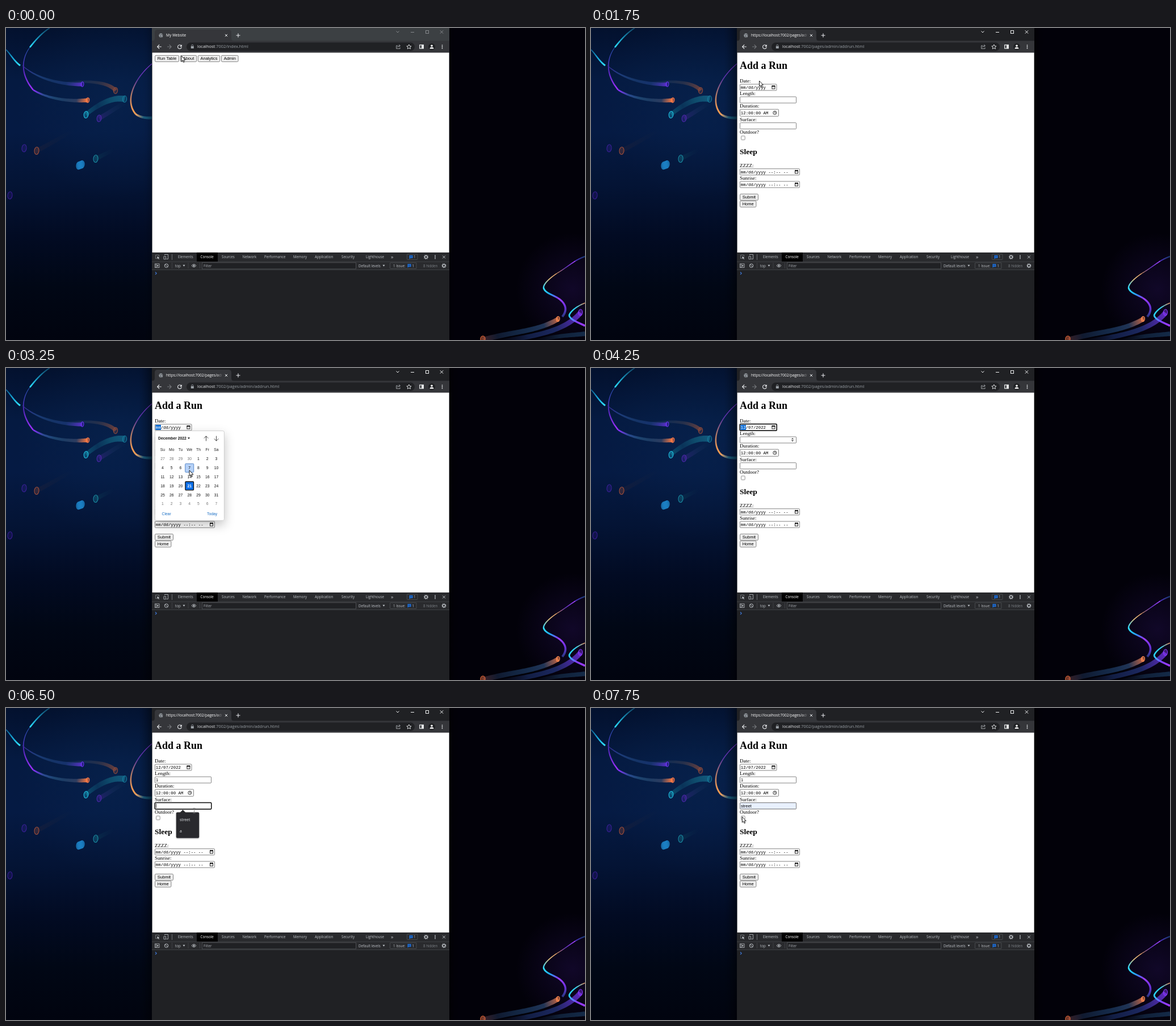
Write an HTML page with a canvas that moves like this. It is 1020 by 549 pixels and loops after 8 s.

```html
<!DOCTYPE html>
<html lang="en">
<head>
<meta charset="utf-8">
<title>My Website</title>
<style>
  html, body { margin: 0; width: 100%; height: 100%; overflow: hidden; background: #020109; }
  canvas, svg { position: absolute; left: 0; top: 0; display: block; }
  text { white-space: pre; }
  .ui { font-family: "Open Sans", "Noto Sans", sans-serif; }
  .page { font-family: "Liberation Serif", "Times New Roman", serif; font-size: 9px; }
  .ctl { font-family: "Liberation Sans", Arial, sans-serif; font-size: 7.5px; }
  .mono { font-family: "Liberation Mono", monospace; font-size: 7.37px; }
  .cal { font-family: "Liberation Sans", Arial, sans-serif; font-size: 6.8px; }
  .mid { text-anchor: middle; }
</style>
</head>
<body>
<canvas id="wall" width="1020" height="549"></canvas>
<svg id="stage" width="1020" height="549" viewBox="0 0 1020 549"></svg>
<script>
const LOOP = 8000;

// ---------- wallpaper ----------
const g = document.getElementById('wall').getContext('2d');

function ramp(x0, y0, x1, y1, colors) {
  const r = g.createLinearGradient(x0, y0, x1, y1);
  colors.forEach((c, i) => r.addColorStop(i / (colors.length - 1), c));
  return r;
}

function glow(x, y, r, color) {
  const s = g.createRadialGradient(x, y, 0, x, y, r);
  s.addColorStop(0, color);
  s.addColorStop(1, color.slice(0, 7) + '00');
  g.fillStyle = s;
  g.fillRect(x - r, y - r, 2 * r, 2 * r);
}

// A cubic ribbon whose width runs from w0 to w1.
function trail([x0, y0, x1, y1, x2, y2, x3, y3], w0, w1, colors) {
  const a = [], b = [], n = 40;
  for (let i = 0; i <= n; i++) {
    const t = i / n, u = 1 - t;
    const x = u*u*u*x0 + 3*u*u*t*x1 + 3*u*t*t*x2 + t*t*t*x3;
    const y = u*u*u*y0 + 3*u*u*t*y1 + 3*u*t*t*y2 + t*t*t*y3;
    const dx = u*u*(x1-x0) + 2*u*t*(x2-x1) + t*t*(x3-x2);
    const dy = u*u*(y1-y0) + 2*u*t*(y2-y1) + t*t*(y3-y2);
    const k = (w0 + (w1 - w0) * t) / 2 / Math.hypot(dx, dy);
    a.push([x - dy * k, y + dx * k]);
    b.unshift([x + dy * k, y - dx * k]);
  }
  g.beginPath();
  a.concat(b).forEach(p => g.lineTo(...p));
  g.fillStyle = ramp(x0, y0, x3, y3, colors);
  g.fill();
}

function ring(x, y, rx, ry, color, fill = '44') {
  g.beginPath();
  g.ellipse(x, y, rx, ry, 0.1, 0, 7);
  g.fillStyle = color + fill;
  g.fill();
  g.strokeStyle = color;
  g.lineWidth = 1.1;
  g.stroke();
}

function wallpaper() {
  g.fillStyle = ramp(0, 0, 0, 549, ['#03112e', '#051a41', '#051a43', '#041435', '#020b23', '#010715', '#01040f']);
  g.fillRect(0, 0, 258, 549);
  glow(190, 130, 170, '#0a2c5a58');
  g.fillStyle = '#020109';
  g.fillRect(258, 0, 762, 549);
  glow(998, 460, 100, '#24105070');

  trail([0, 38, 8, 46, 14, 58, 25, 66], 1.6, 3, ['#0d5f90', '#16a8d8', '#30e4ff']);
  trail([77, 0, 64, 8, 53, 20, 42, 34], 2, 2.6, ['#10405f', '#1588b0', '#2ce0ff']);
  trail([42, 34, 30, 50, 22, 78, 48, 109], 1, 2.6, ['#2450a8', '#5028b8', '#a030ff']);
  trail([29, 66, 50, 86, 90, 100, 134, 99], .8, 7, ['#3a2c9a', '#1c3c78', '#1c4078aa', '#1e3c80aa', '#5a30c8']);
  trail([48, 109, 72, 124, 110, 130, 144, 127], 2.4, 7, ['#8a30ff', '#2a4a90', '#1c4470', '#1e3c64', '#2c3c60', '#ff7a40']);
  trail([100, 97, 140, 92, 180, 94, 193, 110], 3, 7, ['#1c386000', '#223c6077', '#3c3c4e99', '#6a3e3c']);
  trail([209, 125, 190, 121, 165, 132, 141, 152], 11, 7, ['#12587c', '#0e4c6c', '#0c406499', '#0e6480aa']);
  trail([211, 130, 195, 140, 180, 150, 164, 159], 7, 8, ['#102c5000', '#142c5a88', '#2e2278aa']);
  trail([257, 63, 230, 85, 207, 125, 228, 151], 1, 3, ['#9038f0', '#5a34a8', '#b07a68', '#ffa050']);
  trail([228, 151, 234, 156, 244, 159, 258, 158], 3, 5, ['#ffa860', '#1c5c7c', '#0e4868']);
  trail([120, 180, 100, 190, 80, 203, 54, 216], 6, 8, ['#24304000', '#4a2c3033']);
  trail([190, 214, 180, 219, 170, 224, 158, 230], 6, 8, ['#10405000', '#10586844']);

  ring(134.5, 99, 2.5, 4.2, '#6a30f0');
  ring(144, 127, 2.8, 4.2, '#ff7a48', '88');
  ring(193, 110, 3.6, 5.5, '#8a4a3c');
  ring(209, 125, 3.6, 5.8, '#167a9a');
  ring(141, 152.5, 3.8, 6, '#20c8e8');
  ring(164, 159, 3.8, 6, '#5028b0');
  ring(32, 211.5, 4, 6.5, '#3c2098');
  ring(54, 216, 4, 6.5, '#a04e38');
  ring(158, 230, 4, 6.5, '#1a8aa0');
  ring(7, 294.5, 4, 6.5, '#381c92');
  for (let i = 0; i < 4; i++) ring(134 - 2 * i, 240 + .7 * i, 4, 6.6, '#1c80c4', 'aa');

  trail([1020, 402, 1014, 404, 1008, 407, 1003, 410], 2.4, 1.8, ['#14386a', '#5030c0']);
  trail([1003, 410, 992, 417, 982, 425, 970, 432], 1.8, 1.3, ['#a040ff', '#6030b8', '#c08858']);
  trail([970, 432, 958, 440, 947, 450, 947, 457], 1.3, 2.4, ['#ffb070', '#e0c080', '#30d8ff']);
  trail([947, 457, 949, 466, 962, 469, 972, 475], 2.8, 3, ['#2ce8ff', '#20a8f0', '#8040ff']);
  trail([972, 475, 986, 484, 990, 496, 980, 508], 3, 4, ['#a040ff', '#7030e0', '#2c3888']);
  trail([840, 549, 890, 534, 935, 535, 973, 512], 9, 8, ['#3a2026', '#101a30', '#122440', '#162c4c', '#203456', '#c06444']);
  trail([870, 552, 930, 542, 985, 534, 1012, 501], 8, 9, ['#10183000', '#121e44', '#1c2860', '#6028c0']);
  trail([1020, 484, 1008, 488, 994, 498, 992, 506], 1.6, 2.8, ['#e09060', '#30d0f0', '#28d8ff']);
  trail([992, 506, 995, 514, 1008, 518, 1020, 524], 2.8, 3.6, ['#28d8ff', '#8040ff', '#a038ff']);
  trail([930, 552, 965, 541, 995, 541, 1020, 538], 6, 8, ['#10182c00', '#102038', '#142a48']);
  ring(972.5, 512, 3, 4.5, '#ff8a50', '88');
  ring(1012, 500.5, 3.5, 5.5, '#8a38ff', '66');
  ring(840, 547, 4, 5, '#f07040', '66');

  g.shadowColor = 'rgba(0,0,0,.45)';
  g.shadowBlur = 14;
  g.shadowOffsetY = 4;
  g.fillStyle = '#202124';
  g.fillRect(257, -10, 524, 570);
}

// ---------- drawing helpers ----------
const on = (from, to, body) => `<g data-on="${from} ${to}">${body}</g>`;
const text = (x, y, s, cls, size, fill = '#000', more = '') =>
  `<text x="${x}" y="${y}" class="${cls}" fill="${fill}" ${size ? `style="font-size:${size}px"` : ''} ${more}>${s}</text>`;
const rect = (x, y, w, h, fill, more = '') =>
  `<rect x="${x}" y="${y}" width="${w}" height="${h}" fill="${fill}" ${more}/>`;
const line = (d, color, w = 1, fill = 'none') =>
  `<path d="${d}" fill="${fill}" stroke="${color}" stroke-width="${w}"/>`;
const dot = (x, y, r, fill, stroke = 'none', w = 1) =>
  `<circle cx="${x}" cy="${y}" r="${r}" fill="${fill}" stroke="${stroke}" stroke-width="${w}"/>`;
const cross = (x, y, r, color, w = 1) =>
  line(`M${x-r} ${y-r}l${2*r} ${2*r}m0 ${-2*r}l${-2*r} ${2*r}`, color, w);
const dots = (x, y, gap, color) => [-gap, 0, gap].map(d => dot(x, y + d, .9, color)).join('');
const down = (x, y, color) => `<path d="M${x} ${y}h4l-2 3z" fill="${color}"/>`;
const gear = (x, y) => dot(x, y, 2.4, 'none', '#bdc1c6', 1.3) +
  `<circle cx="${x}" cy="${y}" r="3.5" fill="none" stroke="#bdc1c6" stroke-width="1.1" stroke-dasharray="1.3 1.45"/>`;

const box = (x, y, w, h, fill = '#fff') => rect(x + .5, y + .5, w - 1, h - 1, fill, 'stroke="#767676" stroke-width=".9" rx="1"');
const focus = (x, y, w, h) => rect(x + .2, y + .2, w - .4, h - .4, 'none', 'stroke="#101010" stroke-width="1.5" rx="1.5"');
const button = (x, y, w, s) => rect(x + .5, y + .5, w - 1, 11, '#efefef', 'stroke="#767676" stroke-width=".9" rx="1.6"') +
  text(x + w / 2, y + 8.6, s, 'ctl mid');
const dateIcon = (x, y) => rect(x + .5, y + 1, 5, 5, '#fff', 'stroke="#111" stroke-width=".9"') +
  rect(x, y + .6, 6, 1.7, '#111') + rect(x + 1, y, 1, 1, '#111') + rect(x + 4, y, 1, 1, '#111');
const badge = (x, y, color) => `<path d="M${x} ${y}h6v5h-4l-2 1.5z" fill="${color}"/>` +
  line(`M${x+1.2} ${y+1.7}h3.6m-3.6 1.6h3.6`, '#292a2d', .6);

// ---------- browser window ----------
function controls(color) {
  return line('M687.5 5.5l2.5 2.5l2.5 -2.5', color, 1) + line('M713 7.5h6', color, 1) +
    rect(739.5, 4.5, 5, 5, 'none', `stroke="${color}"`) + cross(767.5, 7, 2.7, color, 1);
}

function browser() {
  const ink = '#e8eaed', soft = '#9aa0a6';
  const url = (from, to, path) => on(from, to,
    text(337, 35.4, `localhost<tspan fill="${soft}">:7002/${path}</tspan>`, 'ui', 7.45, ink));
  const tab = s => text(282, 15.3, s, 'ui', 6.55, '#fff', 'clip-path="url(#tabClip)"');
  return on(0, 250, rect(257, 0, 524, 24, '#3c4043') + controls('#85888c')) +
    on(250, LOOP, rect(234, 0, 23, 549, 'url(#shadeL)') + rect(781, 0, 19, 549, 'url(#shadeR)') +
      rect(257, 0, 524, 24, '#202124') + controls('#f1f3f4')) +
    '<path d="M257 23q5 0 5 -5v-10q0 -5 5 -5h125q5 0 5 5v10q0 5 5 5z" fill="#35363a"/>' +
    rect(257, 22.5, 524, 21, '#35363a') +
    dot(273, 13, 3.6, '#9aa0a6') + line('M270.5 11.5q2 2 4 0t1.5 3M271 15q2 -1 3 1', '#35363a', 1) +
    on(0, 750, tab('My Website')) +
    on(750, LOOP, tab('https://localhost:7002/pages/admin') + rect(371, 7, 11, 12, 'url(#tabFade)')) +
    cross(388, 13, 2.1, ink) + line('M405.5 13h7m-3.5 -3.5v7', ink, 1.1) +
    line('M273.8 33h-7m3.4 -3.6l-3.6 3.6l3.6 3.6', ink, 1.1) +
    line('M284 33h7m-3.4 -3.6l3.6 3.6l-3.6 3.6', '#75787c', 1.1) +
    line('M308.6 31a3.4 3.4 0 1 0 .7 2.6', ink, 1.1) + '<path d="M309.8 29v3.8h-3.8z" fill="#e8eaed"/>' +
    rect(318, 25.5, 402, 15, '#202124', 'rx="7.5"') +
    rect(325.8, 32, 5, 4, soft, 'rx=".6"') + line('M326.8 32v-1.2a1.5 1.5 0 0 1 3 0v1.2', soft, .8) +
    url(0, 750, 'index.html') + url(750, 1500, 'pages/admin.html') + url(1500, LOOP, 'pages/admin/addrun.html') +
    line('M690 31h-2.3v5.3h6.4v-2M689.5 34.2q.4 -3 4.5 -3m-1.8 -2l2.3 2l-2.3 2', '#bdc1c6', .8) +
    line('M709.9 29l1.2 2.7l2.9 .3l-2.2 1.9l.7 2.9l-2.6 -1.5l-2.6 1.5l.7 -2.9l-2.2 -1.9l2.9 -.3z', ink, .9) +
    rect(728.8, 29.8, 6.6, 6.2, 'none', 'stroke="#f1f3f4" stroke-width="1.2"') + rect(732, 30, 3.5, 6, '#f1f3f4') +
    dot(750, 33, 6, '#202124') + dot(750, 31.2, 1.8, '#fff') + '<path d="M746.5 36.4q0 -2.6 3.5 -2.6t3.5 2.6z" fill="#fff"/>' +
    dots(768.5, 33, 2.7, ink) +
    rect(257.6, 43.4, 523, 351.6, '#fff');
}

function devtools() {
  const ink = '#bdc1c6', tabs = [['Elements', 303], ['Sources', 380], ['Network', 416.5], ['Performance', 455],
    ['Memory', 506], ['Application', 544], ['Security', 591], ['Lighthouse', 634]];
  const label = (x, y, s, c = ink) => text(x, y, s, 'ui', 6.2, c);
  return rect(257, 395, 524, 154, '#202124') + rect(257, 395, 524, 30.5, '#292a2d') +
    line('M257 411.3h524M257 425.5h524', '#44474b', .8) +
    rect(336, 395, 37, 16, '#000') + label(342.5, 405.3, 'Console', '#fff') +
    tabs.map(([s, x]) => label(x, 405.3, s)).join('') + text(678, 405.6, '»', 'ui', 9, ink) +
    line('M269.5 402v-2.5h-6v6h2.5M292.5 398v10', '#7d8186', .8) + '<path d="M266 402l4.6 1.8l-1.9 .8l1.5 1.8l-.8 .6l-1.4 -1.8l-1 1.6z" fill="#bdc1c6"/>' +
    line('M279.5 399.8v-1.3h6v8h-3M278 402h3.6v4.8h-3.6z', ink, .8) +
    rect(706.5, 398, 18.5, 9.5, 'none', 'stroke="#505357" stroke-width=".8" rx="1"') + label(718, 405.2, '1') +
    on(0, 750, badge(710.5, 400, '#1a73e8')) + on(750, 1500, badge(710.5, 400, '#f0a818')) + on(1500, LOOP, badge(710.5, 400, '#1a73e8')) +
    gear(740, 403) + dots(756, 403, 2.5, ink) + cross(771.5, 403, 2.4, ink) +
    rect(262.5, 415, 7.5, 6.5, 'none', 'stroke="#bdc1c6" stroke-width=".8"') + line('M264.5 415v6.5', ink, .8) + '<path d="M266 416.4l3 1.9l-3 1.9z" fill="#bdc1c6"/>' +
    dot(282.5, 418.2, 3.2, 'none', ink) + line('M280.3 416l4.4 4.4', ink) +
    line('M292.5 413v10M321 413v10M341.5 413v10', '#44474b', .8) +
    label(298, 420.5, 'top') + down(311.5, 416.8, ink) +
    line('M327 418.2q4 -5 8 0q-4 5 -8 0z', ink, .9) + dot(331, 418.2, 1.4, ink) +
    rect(345.4, 412.9, 271, 11, '#202124', 'stroke="#55585c" stroke-width=".8"') + label(348, 420.7, 'Filter', '#a5a9ae') +
    label(621, 420.5, 'Default levels') + down(663.5, 416.8, ink) +
    rect(676.5, 413, 46.5, 10.5, 'none', 'stroke="#505357" stroke-width=".8" rx="1"') +
    label(682, 420.5, '1 Issue:') + badge(707.5, 415.3, '#1a73e8') + label(715.5, 420.5, '1') +
    label(735, 420.5, '8 hidden', '#7d8186') + gear(771.5, 418.2) +
    line('M263 429.5l2.2 2.2l-2.2 2.2', '#3f7de0', 1.1);
}

// ---------- pages ----------
const heading = (y, s, size) => text(262, y, s, 'page', size, '#000', 'font-weight="bold"');

const home = () => button(262, 47.8, 43, 'Run Table') + button(306.8, 47.8, 29.4, 'About') +
  button(337.8, 47.8, 39.4, 'Analytics') + button(379, 47.8, 30.6, 'Admin');

const admin = () => heading(71.8, 'Admin', 18) + button(262, 88.4, 44.8, 'Add a Run') + button(308.4, 88.4, 29.6, 'Home');

function form() {
  const mono = (y, s, fill) => text(263.8, y, s, 'mono', 0, fill);
  const labels = [['Date:', 96.4], ['Length:', 118.4], ['Duration:', 140.4], ['Surface:', 164],
    ['Outdoor?', 185.8], ['ZZZZ:', 244.8], ['Sunrise:', 267]];
  const stamp = y => box(262, y, 106, 12) + mono(y + 8.5, 'mm/dd/yyyy --:-- --') + dateIcon(359, y + 2.6);
  const mark = s => rect(263.4, 100, 9.6, 9, '#0a6cd6') + mono(107, s, '#fff');
  return heading(71.8, 'Add a Run', 18) + heading(222.3, 'Sleep', 13.5) +
    labels.map(([s, y]) => text(262, y, s, 'page')).join('') +
    box(262, 98.4, 65.5, 12) + dateIcon(318.4, 101) +
    on(1500, 3750, mono(107, 'mm/dd/yyyy')) + on(3750, LOOP, mono(107, '12/07/2022')) +
    on(2750, 3750, mark('mm')) + on(3750, 5000, mark('12') + focus(262, 98.4, 65.5, 12)) +
    box(262, 120.5, 100, 12) +
    on(4250, 6250, '<path d="M352.8 125.6h4.4l-2.2 -2.6zM352.8 127h4.4l-2.2 2.6z" fill="#555"/>') +
    on(5000, 6250, focus(262, 120.5, 100, 12)) + on(5000, 5250, rect(264.2, 122.4, .8, 8, '#000')) +
    on(5250, LOOP, text(264, 129.2, '1', 'ctl')) +
    box(262, 142.6, 69, 13.2) + mono(152, '12:00:00 AM') + dot(323.8, 149.2, 3, 'none', '#111', .9) + line('M323.8 147.2v2.2h1.6', '#111', .8) +
    box(262, 166.2, 100, 12) +
    on(6250, 7000, focus(262, 166.2, 100, 12) + rect(264.2, 168.2, .8, 8, '#000')) +
    on(7000, LOOP, box(262, 166.2, 100, 12, '#e8f0fe') + text(264, 174.8, 'street', 'ctl')) +
    rect(264.6, 190, 6.6, 6.8, '#fff', 'stroke="#767676" stroke-width=".8" rx="1.2"') +
    stamp(247.2) + stamp(269.4) + button(262, 291.6, 33, 'Submit') + button(262, 303.6, 29.4, 'Home');
}

function calendar() {
  const col = i => 276 + 15.75 * i, row = i => 146.4 + 15.83 * i;
  let s = rect(262.4, 110.6, 122, 157.8, '#fff', 'rx="2.5" stroke="#c4c4c4" stroke-width=".8" filter="url(#shade)"') +
    text(268, 125.6, 'December 2022', 'cal', 6.8, '#111', 'font-weight="bold"') + down(320, 122.2, '#222') +
    line('M352.5 128.5v-8.6m-3.8 3.8l3.8 -3.8l3.8 3.8', '#333', .9) +
    line('M370.5 119.6v8.6m-3.8 -3.8l3.8 3.8l3.8 -3.8', '#333', .9) +
    rect(315.7, 168.4, 15, 15, '#b5d1f7', 'stroke="#4a7fc4" stroke-width=".9" rx="1"') +
    rect(315.9, 200, 14.6, 14.8, '#0d6fe8', 'stroke="#101010" stroke-width="1.3" rx="1"');
  ['Su', 'Mo', 'Tu', 'We', 'Th', 'Fr', 'Sa'].forEach((d, i) => s += text(col(i), row(0), d, 'cal mid', 6.8, '#222'));
  for (let i = 0; i < 42; i++) {
    const n = i - 3, out = n < 1 || n > 31;
    const day = n < 1 ? n + 30 : n > 31 ? n - 31 : n;
    const today = n === 21;
    s += text(col(i % 7), row(1 + Math.floor(i / 7)), day, 'cal mid', 6.8,
      today ? '#fff' : out ? '#777' : '#111', today ? 'font-weight="bold"' : '');
  }
  return s + text(274.5, 259, 'Clear', 'cal', 6.8, '#1a6fc4') + text(354, 259, 'Today', 'cal', 6.8, '#1a6fc4');
}

const suggest = () => '<path d="M306 184.5l5.5 -5.5l5.5 5.5z" fill="#292a2d"/>' +
  rect(299.8, 183.6, 40.4, 45.2, '#292a2d', 'rx="2" filter="url(#small)"') +
  on(6750, 7000, rect(299.8, 187, 40.4, 19, '#404246')) +
  text(306, 198.6, 'street', 'ui', 6.8, '#e8eaed') + text(306, 219, 'a', 'ui', 6.8, '#e8eaed');

const status = (w, path) => rect(257.5, 383, w, 12, '#35363a', 'rx="1.5"') +
  text(260, 391.3, 'https://localhost:7002/pages/' + path, 'ui', 6.4, '#fff');

const fade = (id, color, a, b) => `<linearGradient id="${id}">
  <stop stop-color="${color}" stop-opacity="${a}"/><stop offset="1" stop-color="${color}" stop-opacity="${b}"/></linearGradient>`;

const defs = `<defs>
  <clipPath id="tabClip"><rect x="280" y="5" width="101" height="16"/></clipPath>
  ${fade('tabFade', '#35363a', 0, 1)}${fade('shadeL', '#000', 0, .3)}${fade('shadeR', '#000', .3, 0)}
  <filter id="shade" x="-30%" y="-30%" width="160%" height="170%"><feDropShadow dx="0" dy="7" stdDeviation="9" flood-opacity=".24"/></filter>
  <filter id="small" x="-30%" y="-30%" width="160%" height="160%"><feDropShadow dx="0" dy="1" stdDeviation="1" flood-opacity=".35"/></filter>
</defs>`;

wallpaper();
const stage = document.getElementById('stage');
stage.innerHTML = defs + browser() +
  on(0, 750, home()) + on(750, 1500, admin()) + on(1500, LOOP, form()) +
  on(2750, 3750, calendar()) + on(6500, 7000, suggest()) +
  on(500, 750, status(128, 'admin.html')) +
  on(750, 1000, `<g opacity=".37">${status(128, 'admin.html')}</g>`) +
  on(1250, 1500, status(154, 'admin/addrun.html')) +
  devtools() +
  '<path id="arrow" d="M0 0V9.8L2.2 7.8L3.8 11.4L5.4 10.7L3.9 7.2H6.9Z" fill="#fff" stroke="#000" stroke-width=".9"/>' +
  '<path id="beam" d="M-2 0h1.4l.6 .5l.6 -.5h1.4M0 .5v8M-2 9h1.4l.6 -.5l.6 .5h1.4" fill="none" stroke="#777" stroke-width=".8"/>';

// ---------- playback ----------
// time, x, y, pointer shape
const moves = [[0, 309, 49, 'arrow'], [250, 352, 51, 'arrow'], [500, 391, 53, 'arrow'], [1000, 345, 76, 'arrow'],
  [1250, 296.5, 93, 'arrow'], [2000, 307, 97, 'arrow'], [2250, 319, 103, 'arrow'], [2750, 321, 106, 'arrow'],
  [3000, 323, 145, 'arrow'], [3250, 323, 180, 'arrow'], [4000, 333, 150, 'arrow'], [4250, 340, 122, ''],
  [5750, 338, 140, 'arrow'], [6000, 331.5, 168, 'beam'], [6500, 331.5, 176, 'beam'], [6750, 320, 194, 'arrow'],
  [7250, 304, 195, 'arrow'], [7500, 280, 193, 'arrow'], [7750, 266.3, 191.5, 'arrow']];
const parts = [...stage.querySelectorAll('[data-on]')].map(el => [el, ...el.dataset.on.split(' ').map(Number)]);
const pointers = ['arrow', 'beam'].map(id => document.getElementById(id));
const start = performance.now();

function draw() {
  const t = (performance.now() - start) % LOOP;
  for (const [el, from, to] of parts) el.style.display = t >= from && t < to ? '' : 'none';
  const [, x, y, shape] = moves.filter(m => m[0] <= t).pop();
  for (const p of pointers) {
    p.style.display = p.id === shape ? '' : 'none';
    p.setAttribute('transform', `translate(${x} ${y})`);
  }
  requestAnimationFrame(draw);
}
draw();
</script>
</body>
</html>
```
